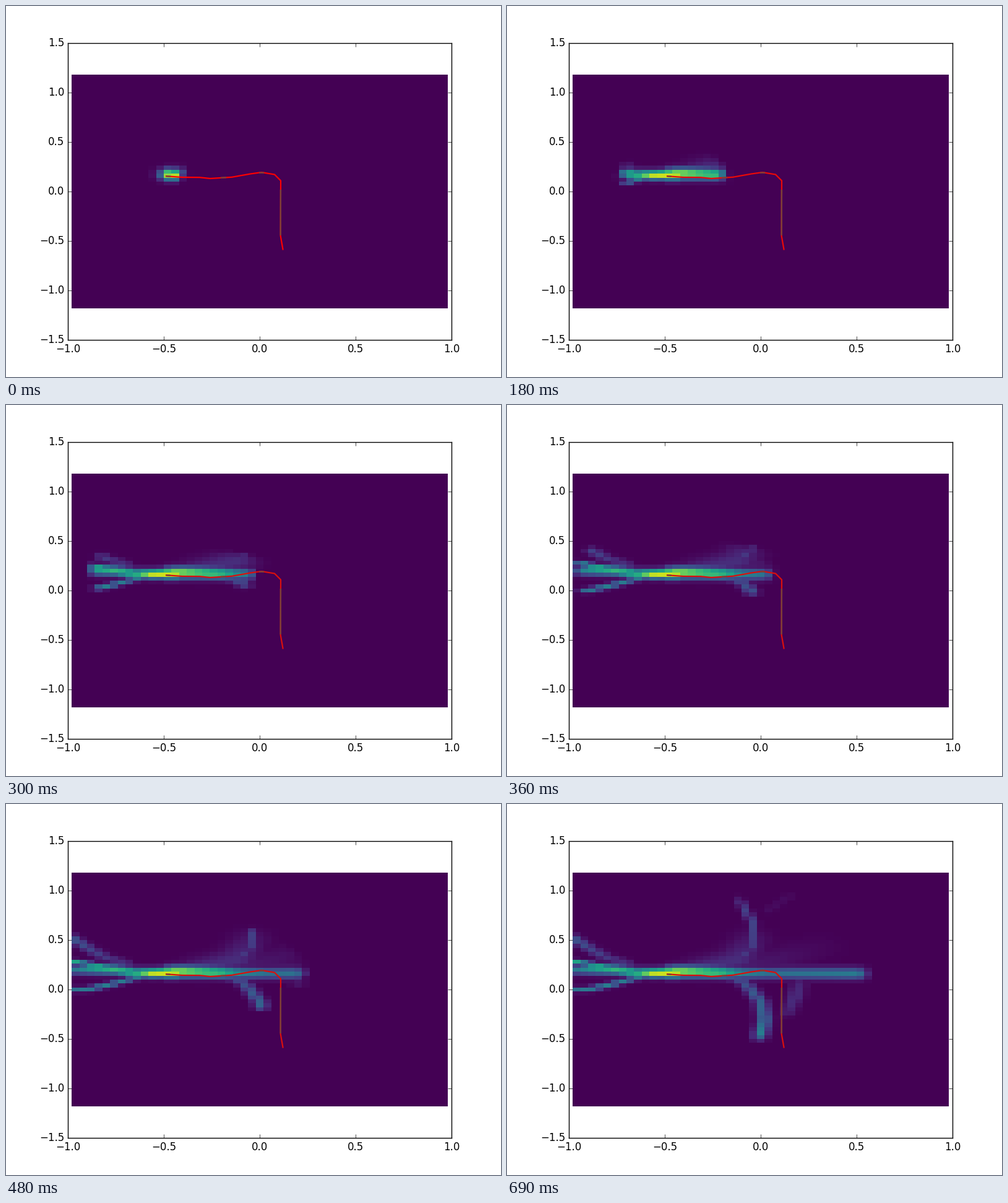
A matplotlib script that plays this animation: 800 by 600 pixels, repeating every 0.72 s.

```python
import numpy as np
import matplotlib.pyplot as plt
from matplotlib.animation import FuncAnimation

plt.style.use("classic")
plt.rcParams.update({"font.family": "DejaVu Sans", "font.size": 12})

FRAMES, INTERVAL = 24, 30
CELL = .04
ORIGIN = (-.46, .17)
SOFT = .06  # depth of the fading front

x_edges = -.98 + CELL * np.arange(50)
y_edges = -1.18 + CELL * np.arange(60)
gx, gy = np.meshgrid(x_edges[:-1] + CELL / 2, y_edges[:-1] + CELL / 2)


def stroke(width, *keys):
    """Density and travel distance per cell for a soft path of (x, y, density)."""
    x, y, level = np.array(keys).T
    length = np.append(0, np.cumsum(np.hypot(np.diff(x), np.diff(y))))
    s = np.linspace(0, length[-1], 150)
    px, py, strength = (np.interp(s, length, v) for v in (x, y, level))
    gap = np.hypot(gx[..., None] - px, gy[..., None] - py)
    near = gap.argmin(axis=-1)
    density = strength[near] * np.exp(-(gap.min(axis=-1) / width) ** 2)
    offset = np.hypot(x[0] - ORIGIN[0], y[0] - ORIGIN[1])
    return density, offset + s[near]


STROKES = [
    # main band, right then left
    stroke(.055, (-.46, .172, 1), (-.42, .18, .9), (-.3, .178, .77),
           (-.2, .172, .68), (-.1, .168, .45), (.04, .165, .36), (.6, .16, .42)),
    stroke(.045, (-.46, .172, 1), (-.56, .166, .92), (-.64, .17, .64),
           (-.76, .2, .66), (-.98, .2, .38)),
    # left branches
    stroke(.025, (-.72, .2, .5), (-.88, .25, .57), (-.98, .28, .62)),
    stroke(.025, (-.64, .12, .4), (-.8, .04, .42), (-.9, 0, .42), (-.98, 0, .35)),
    stroke(.035, (-.7, .27, .12), (-.8, .32, .16), (-.88, .4, .2), (-.98, .52, .28)),
    # downward branches
    stroke(.035, (-.16, .12, .15), (-.08, .06, .25), (0, -.12, .3),
           (.02, -.3, .36), (0, -.44, .42), (-.02, -.58, .05)),
    stroke(.04, (.2, .06, .1), (.18, -.08, .14), (.13, -.26, .08), (.11, -.4, .05)),
    # upward branch, ray and haze
    stroke(.025, (-.08, .36, .16), (-.04, .44, .17), (-.04, .68, .2),
           (-.08, .8, .19), (-.12, .94, .12)),
    stroke(.03, (.04, .8, .03), (.16, .96, .03)),
    stroke(.1, (-.3, .22, .12), (-.12, .3, .13), (-.05, .5, .06)),
    stroke(.12, (0, .26, .06), (.3, .42, .02)),
]


def density(n):
    reach = .076 + .036 * n + .00025 * n ** 2
    layers = [d * np.clip((reach - far) / SOFT, 0, 1) for d, far in STROKES]
    return np.max(layers, axis=0)


def to_data(points):
    x, y = np.array(points, float).T
    return (x - 410) / 310, (300 - y) / 160


fig = plt.figure(figsize=(8, 6), dpi=100, facecolor="white")
ax = fig.add_axes([.125, .1, .775, .8])
mesh = ax.pcolormesh(x_edges, y_edges, density(0), cmap="viridis", vmin=0, vmax=1)

PATH = [(259, 275.2), (285, 277), (313, 277.2), (330, 279), (365, 276.8),
        (395, 271.5), (413, 269), (434, 272.5), (444, 282.5),
        (443.7, 372), (447.5, 393.5)]
DULL = [
    [(259, 275.2), (266, 275.7)],
    [(347, 277.8), (356, 277.3)],
    [(409, 269.6), (417, 269.7)],
    [(443.9, 297), (443.7, 371)],
]
path, = ax.plot(*to_data(PATH), color="red", lw=1.6)
for part in DULL:
    ax.plot(*to_data(part), color="#7d4038", lw=1.7, solid_capstyle="butt")

ax.set_xlim(-1, 1)
ax.set_ylim(-1.5, 1.5)
ax.set_xticks(np.arange(-1, 1.1, .5))
ax.set_yticks(np.arange(-1.5, 1.6, .5))


def draw(n):
    mesh.set_array(density(n))
    fade = min(n / 10, 1)
    path.set_color((1 - .14 * fade, .06 * fade, .05 * fade))
    return mesh, path


anim = FuncAnimation(fig, draw, frames=FRAMES, interval=INTERVAL,
                     repeat=True, repeat_delay=0)
plt.show()
```
